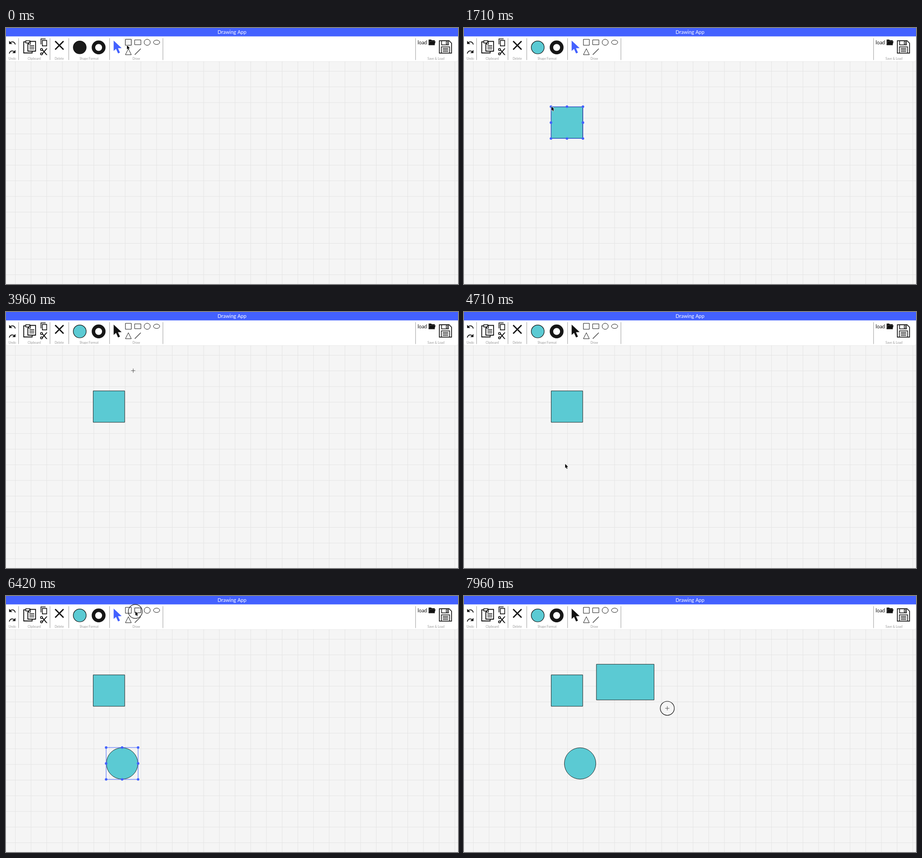
Recreate the animation shown at these times as an HTML page with a canvas. Size 993x564 px, loop 8000 ms.

```html
<!DOCTYPE html>
<html lang="en">
<head>
<meta charset="utf-8">
<title>Drawing App</title>
<style>
html, body { margin: 0; width: 100%; height: 100%; overflow: hidden; background: #f5f5f5; }
canvas { display: block; width: 993px; height: 564px; }
</style>
</head>
<body>
<canvas id="stage" width="993" height="564"></canvas>
<script>
const W = 993, H = 564, LOOP = 8000;
const BLUE = '#4361ff', TEAL = '#5bcad3', INK = '#111', GRID = '#e4e4e4';
const SIZE = 69.2, CELL = 34.48, TOOL = 20.7;
const ctx = document.getElementById('stage').getContext('2d');

const smooth = u => u * u * (3 - 2 * u);
const settle = u => 1 - (1 - u) ** 4;
const speedUp = u => u ** 1.25;

// Pointer moves: start, end, destination, easing
const HOME = [265.5, 38];
const MOVES = [
  [260, 860, 188, 208, smooth],
  [860, 1120, 162, 239, smooth],
  [1120, 1470, 192, 173, smooth],
  [2140, 2960, 306, 34.3, smooth],
  [3650, 4480, 222, 334.8, smooth],
  [4850, 5830, 275.2, 34.5, settle],
  [6110, 6350, 284, 34, smooth],
  [6800, 7200, 287.2, 157.5, smooth],
  [7230, 7540, 292, 149.5, smooth],
  [7700, 8000, 476, 266, speedUp]
];

// Clicks alternate between choosing a tool and placing a shape; the last is held
const CLICKS = [60, 1485, 3500, 4570, 6380, 7540];
const PRESS = 130, DELAY = 220;
const HELD = CLICKS.length - 1;
const effect = CLICKS.map(c => c + DELAY);

function pointer(t) {
  let [x, y] = HOME;
  for (const [start, end, toX, toY, ease] of MOVES) {
    if (t < start) break;
    const u = ease(Math.min(1, (t - start) / (end - start)));
    x += (toX - x) * u;
    y += (toY - y) * u;
  }
  return [x, y];
}

function stateAt(t) {
  const [x, y] = pointer(t);
  const armed = effect.filter((e, i) => i < HELD && t >= e).length % 2 === 1;
  const last = CLICKS.filter(c => t >= c).length - 1;
  const age = last < 0 ? Infinity : t - CLICKS[last];
  const pressed = age < PRESS || last === HELD;
  const waiting = !pressed && age < DELAY;
  return { x, y, armed, pressed, cross: armed && y > 74 && !waiting };
}

function paint(fill, stroke, width = 1) {
  if (fill) { ctx.fillStyle = fill; ctx.fill(); }
  if (stroke) { ctx.strokeStyle = stroke; ctx.lineWidth = width; ctx.stroke(); }
}
function box(x, y, w, h, ...style) {
  ctx.beginPath(); ctx.rect(x, y, w, h); paint(...style);
}
function oval(x, y, rx, ry, ...style) {
  ctx.beginPath(); ctx.ellipse(x, y, rx, ry, 0, 0, 7); paint(...style);
}
function poly(points, closed, ...style) {
  ctx.beginPath();
  points.forEach(([x, y]) => ctx.lineTo(x, y));
  if (closed) ctx.closePath();
  paint(...style);
}
const line = (x1, y1, x2, y2, color, width) => poly([[x1, y1], [x2, y2]], false, null, color, width);

// Evenly spaced text lines inside an icon
function rules(x, y, w, gap) {
  for (let i = 0; i < 3; i++) line(x, y + i * gap, x + w, y + i * gap, INK, 1.5);
}

function text(str, x, y, size, color, align = 'center') {
  ctx.font = `${size}px Lato, sans-serif`;
  ctx.textAlign = align;
  ctx.fillStyle = color;
  ctx.fillText(str, x, y);
}

function drawGrid() {
  box(0, 0, W, H, '#f5f5f5');
  for (let x = 20.5; x < W; x += CELL) line(x, 74, x, H, GRID, 1);
  for (let y = 95.3; y < H; y += CELL) line(0, y, W, y, GRID, 1);
}

function undoArrow(y, flip) {
  ctx.save();
  ctx.translate(13.8, y);
  ctx.scale(flip, 1);
  poly([[-7, -4.5], [-7, 2.5], [0, 2.5]], true, INK);
  ctx.beginPath();
  ctx.moveTo(-5, 0);
  ctx.bezierCurveTo(-1, -4, 5, -3, 6.6, 3.6);
  paint(null, INK, 1.8);
  ctx.restore();
}

function pasteIcon() {
  box(39, 30.5, 18.5, 24.5, '#fff', INK, 1.8);
  box(43.5, 28, 9, 5, '#fff', INK, 1.6);
  poly([[48, 35], [53.5, 29.5], [65, 29.5], [65, 51], [48, 51]], true, '#fff', INK, 1.8);
  poly([[48, 35.5], [53.7, 35.5], [53.7, 29.5]], false, null, INK, 1.3);
  rules(51.5, 38.7, 10.5, 3.6);
}

function copyIcon() {
  poly([[76.8, 36], [76.8, 24], [87, 24]], false, null, INK, 1.6);
  box(79.8, 27.4, 9.6, 12, '#fff', INK, 1.6);
}

function cutIcon() {
  const y = 52.2;
  for (const s of [-1, 1]) {
    oval(78, y + s * 4.8, 2.2, 2.2, null, INK, 1.7);
    poly([[79.2, y + s * 3.8], [88.5, y - s * 7.3], [91, y - s * 7.3], [80.5, y + s * 5.2]], true, INK);
  }
}

function deleteIcon() {
  for (const s of [-1, 1]) line(117.2 - 9.2, 38.3 - s * 9.2, 117.2 + 9.2, 38.3 + s * 9.2, INK, 2.8);
}

function folderIcon() {
  poly([[928.5, 25.5], [934, 25.5], [935.5, 27], [942, 27], [942, 38], [928.5, 38]], true, INK);
  poly([[928.2, 37], [930.8, 29.6], [943.6, 29.6], [941.6, 37]], true, INK, '#777', 0.5);
}

function saveIcon() {
  poly([[952, 28.2], [973.5, 28.2], [978.8, 33.5], [978.8, 55.3], [952, 55.3]], true, '#fff', INK, 1.7);
  box(957, 28.2, 15, 9, '#fff', INK, 1.5);
  box(967, 30, 2.6, 5.5, null, INK, 1.2);
  box(956.5, 41.5, 18, 13.8, '#fff', INK, 1.5);
  rules(959.5, 45, 12, 3.3);
}

function drawTools(px, py) {
  const x = i => 268.8 + i * TOOL, top = 31.5, low = top + TOOL, half = TOOL / 2;
  for (let i = 0; i < 6; i++) {
    const cx = x(i % 4), cy = i < 4 ? top : low;
    if (Math.max(Math.abs(px - cx), Math.abs(py - cy)) < half) box(cx - half, cy - half, TOOL, TOOL, '#f4f4f4');
  }
  box(x(0) - 6.5, top - 6.5, 13, 13, null, INK);
  box(x(1) - 6.8, top - 5.3, 13.6, 10.6, null, INK);
  oval(x(2), top, 6.7, 6.7, null, INK);
  oval(x(3), top, 6.8, 4.8, null, INK);
  poly([[x(0), low - 6.5], [x(0) + 6.5, low + 6.7], [x(0) - 6.5, low + 6.7]], true, null, INK);
  line(x(1) - 6.6, low + 6.6, x(1) + 6.6, low - 6.6, INK, 1.2);
}

function label(str, x, divider) {
  text(str, x, 69.5, 6.9, '#999');
  line(divider, 22.5, divider, 70.5, '#aaa', 1.2);
}

function drawBars({ x, y, armed }, fill) {
  ctx.save();
  ctx.shadowColor = 'rgba(0,0,0,.14)';
  ctx.shadowBlur = 2;
  ctx.beginPath();
  ctx.roundRect(0, 10, W, 63.5, 4);
  paint('#fff');
  ctx.restore();
  box(0, 0, W, 18.6, BLUE);
  text('Drawing App', 496.5, 13, 11.03, '#fff');

  label('Undo', 13.7, 27.6);
  label('Clipboard', 62, 96.6);
  label('Delete', 117, 137.8);
  label('Shape Format', 182.5, 227.5);
  label('Draw', 286.2, 344.7);
  label('Save & Load', 944.6, 899.7);

  undoArrow(32.8, 1);
  undoArrow(52.8, -1);
  pasteIcon();
  copyIcon();
  cutIcon();
  deleteIcon();
  oval(162, 42.8, 14.2, 14.2, fill, INK, 1.2);
  oval(203.5, 42.8, 11.4, 11.4, null, '#161616', 7.6);
  poly([[236.5, 27.8], [236.5, 50.5], [241.7, 46], [246.2, 56], [250.4, 54.2], [246, 44.6], [254, 44.2]],
    true, armed ? INK : BLUE);
  drawTools(x, y);
  text('load', 904.3, 36, 11.03, INK, 'left');
  folderIcon();
  saveIcon();
}

function selection(x, y) {
  const side = SIZE + 1;
  box(x, y, side, side, null, BLUE);
  for (let i = 0; i < 9; i++) {
    if (i !== 4) oval(x + (i % 3) * side / 2, y + Math.floor(i / 3) * side / 2, 2.8, 2.8, BLUE);
  }
}

function drawShapes(t, armed) {
  if (t >= effect[1]) {
    box(191.6, 173.8, SIZE, SIZE, TEAL, INK, 0.9);
    if (t < effect[2]) selection(191.1, 173.3);
  }
  if (t >= effect[3]) {
    oval(255.1, 368.9, SIZE / 2, SIZE / 2, TEAL, INK, 0.9);
    if (!armed) selection(220, 333.8);
  }
  const [dragStart] = MOVES[MOVES.length - 1];
  if (t > dragStart) {
    // The dragged corner trails the pointer a little
    const [x, y] = pointer(t - 40);
    box(290.9, 150.3, Math.max(1, x - 290.9), Math.max(1, y - 150.3), TEAL, INK, 0.9);
  }
}

function drawPointer({ x, y, pressed, cross }) {
  if (pressed) oval(x, y, 15.4, 15.4, null, INK, 1.2);
  if (cross) {
    line(x - 4.6, y, x + 4.6, y, '#444', 0.9);
    line(x, y - 4.6, x, y + 4.6, '#444', 0.9);
    return;
  }
  ctx.save();
  ctx.translate(x, y);
  ctx.lineJoin = 'round';
  const arrow = [[0.3, 0], [0.3, 9], [2.2, 7.2], [3.7, 10.6], [5.2, 9.9], [3.8, 6.6], [6.6, 6.4]];
  poly(arrow, true, '#000', '#fff', 1.2);
  poly(arrow, true, '#000');
  ctx.restore();
}

function frame() {
  const t = performance.now() % LOOP;
  const state = stateAt(t);
  drawGrid();
  drawBars(state, t < effect[1] ? '#1a1a1a' : TEAL);
  drawShapes(t, state.armed);
  drawPointer(state);
  requestAnimationFrame(frame);
}
requestAnimationFrame(frame);
</script>
</body>
</html>
```
